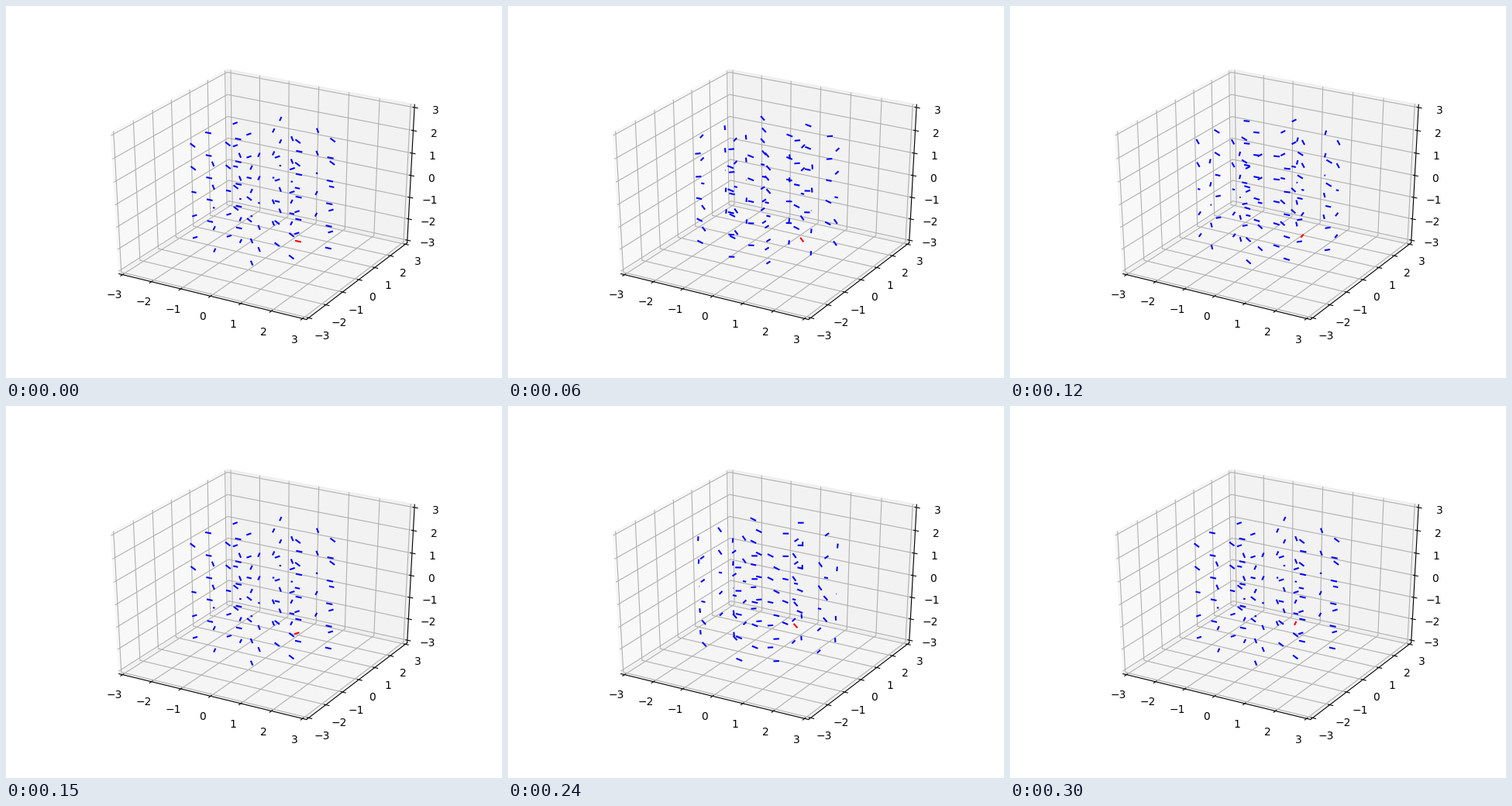
Recreate the animation shown at these times as a matplotlib script. Size 640 by 480 pixels, loop 0.33 s.

```python
import numpy as np
import matplotlib.pyplot as plt
from matplotlib.animation import FuncAnimation
from matplotlib.collections import LineCollection
from matplotlib.patches import Polygon

W, H, DPI = 640, 480, 100
FRAMES, INTERVAL = 11, 30

# Camera: elevation 30, azimuth -60, distance 10, box stretched to the axes area
ELEV, AZIM, DIST = np.radians(30), np.radians(-60), 10
SCALE = np.array([496.0, 369.6]) / 0.185
ORIGIN = np.array([80.0, 52.8]) + 0.095 * SCALE
EYE = np.array([np.cos(ELEV) * np.cos(AZIM), np.cos(ELEV) * np.sin(AZIM), np.sin(ELEV)])
RIGHT = np.array([-np.sin(AZIM), np.cos(AZIM), 0])
UP = np.cross(EYE, RIGHT)

LIMIT = 3.125          # axis range of 3 plus a small margin
LABEL_PAD = 0.443
TICKS = range(-3, 4)
ROD = 0.2


def project(points):
    p = np.asarray(points, float) / 6
    depth = DIST - p @ EYE
    flat = np.stack([p @ RIGHT, p @ UP], axis=-1) / depth[..., None]
    return ORIGIN + SCALE * flat


def with_value(point, axis, value):
    moved = np.array(point, float)
    moved[axis] = value
    return moved


def draw_line(points, order):
    xy = project(points)
    ax.plot(xy[:, 0], xy[:, 1], color="black", lw=0.8, zorder=order)


def draw_pane(axis, grey):
    a, b = (axis + 1) % 3, (axis + 2) % 3
    corners = []
    for sa, sb in ((-1, -1), (1, -1), (1, 1), (-1, 1)):
        p = with_value(BACK, a, sa * LIMIT)
        corners.append(with_value(p, b, sb * LIMIT))
    ax.add_patch(Polygon(project(corners), closed=True, color=(grey,) * 3,
                         alpha=0.5, lw=1, zorder=0))


def draw_axis(axis, edge, tick_dir):
    edge = np.array(edge, float) * LIMIT
    order = 1 + axis
    draw_line([with_value(edge, axis, -LIMIT), with_value(edge, axis, LIMIT)], order)

    grid = []
    for t in TICKS:
        mid = with_value(BACK, axis, t)
        ends = [with_value(mid, i, -mid[i]) for i in ((axis + 1) % 3, (axis + 2) % 3)]
        grid.append(project([ends[0], mid, ends[1]]))
    ax.add_collection(LineCollection(grid, colors="#b0b0b0", linewidths=0.8,
                                     zorder=order + 0.1), autolim=False)

    for t in TICKS:
        pos = with_value(edge, axis, t)
        side = np.sign(edge[tick_dir])
        inner, outer = (with_value(pos, tick_dir, side * (LIMIT + d)) for d in (-0.05, 0.1))
        draw_line([inner, outer], order + 0.2)
        x, y = project(pos + np.sign(edge) * LABEL_PAD)
        ax.text(x, y, str(t).replace("-", "\u2212"), ha="center", va="top",
                fontsize=10, family="DejaVu Sans", zorder=order + 0.3)


fig = plt.figure(figsize=(W / DPI, H / DPI), dpi=DPI, facecolor="white")
ax = fig.add_axes([0, 0, 1, 1])
ax.set_axis_off()

BACK = np.array([-1, 1, -1]) * LIMIT
for axis, grey in enumerate((0.95, 0.90, 0.925)):
    draw_pane(axis, grey)
draw_axis(0, (0, -1, -1), 1)
draw_axis(1, (1, 0, -1), 0)
draw_axis(2, (1, 1, 0), 0)

# Two rings of ten rods on five levels; the first rod is marked red
radius, start, level = (g.ravel() for g in np.meshgrid(
    [1, 2], np.arange(10) * np.pi / 5, np.arange(-2, 3), indexing="ij"))
rods = LineCollection([], colors=["red"] + ["blue"] * (len(radius) - 1),
                      linewidths=1.5, zorder=10)
ax.add_collection(rods, autolim=False)
ax.set_xlim(0, W)
ax.set_ylim(0, H)


def update(frame):
    theta = start + 2 * np.pi * frame / 50
    tail = np.stack([radius * np.cos(theta), radius * np.sin(theta), level], axis=-1)
    heading = np.stack([np.cos(4 * theta), 0 * theta,
                        np.sign(level) * np.sin(4 * theta)], axis=-1)
    rods.set_segments(np.stack([project(tail), project(tail + ROD * heading)], axis=1))
    return [rods]


anim = FuncAnimation(fig, update, frames=FRAMES, interval=INTERVAL,
                     init_func=lambda: update(0), repeat=True, repeat_delay=0)
plt.show()
```
